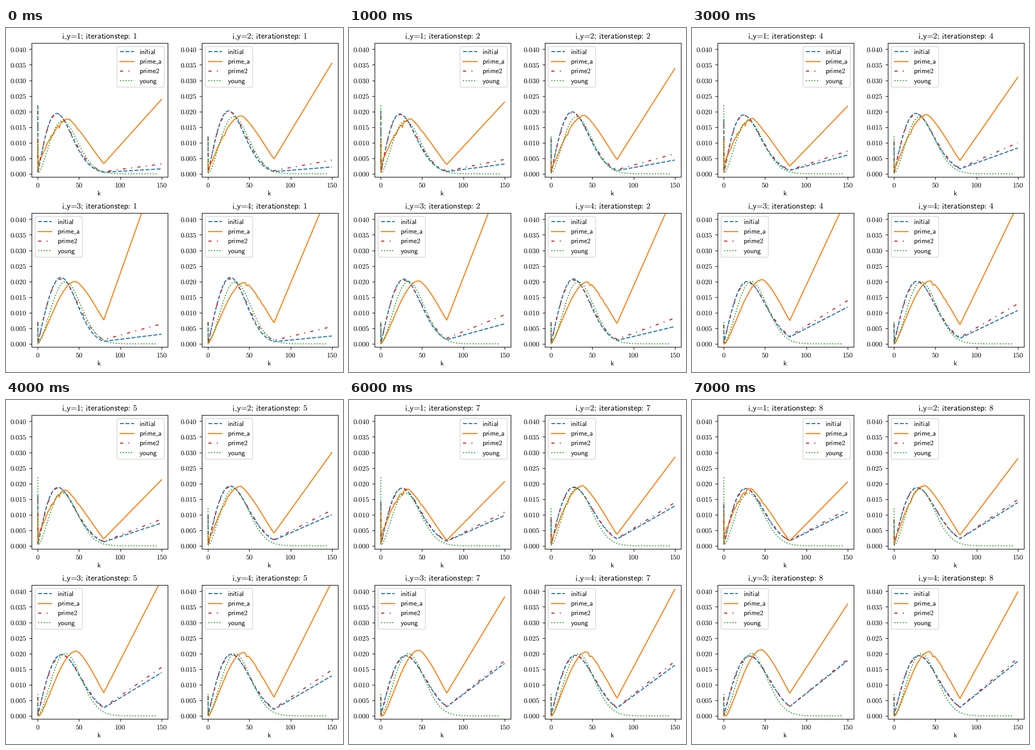
These frames come from a looping animation (671 by 686 pixels, 8000 ms). A matplotlib script:

```python
import numpy as np
import matplotlib.pyplot as plt
from matplotlib.animation import FuncAnimation
from matplotlib.patches import FancyBboxPatch

W, H, DPI = 671, 686, 100
STEPS = 8
plt.rcParams['mathtext.fontset'] = 'cm'
plt.rcParams['text.hinting'] = 'none'

BLUE, ORANGE, RED, GREEN = 'C0', 'C1', 'C3', 'C2'
STYLES = [
    ('initial', BLUE, '--'),
    (r'prime\hspace{.41}a', ORANGE, '-'),
    ('prime2', RED, (0, (3, 5, 1, 5))),
    ('young', GREEN, ':'),
]
K = np.arange(1, 81)
K_YOUNG = np.arange(1, 145)

# Triples are values at steps 1, 4 and 8; a quadratic joins them.
PANELS = [
    dict(pos=(51, 30), legend=221.1,
         initial=dict(peak=(.0194, .0189, .0184), at=(23, 24, 26.5),
                      end=(.0005, .0011, .0016), tail=(.0016, .0060, .0108),
                      spike=(.0220, .0175, .0135)),
         prime=dict(peak=(.0176, .0178, .0184), at=(37.5, 35, 33),
                    end=(.0033, .0025, .0016), tail=(.0239, .0217, .0205),
                    shift=(0, 0, 0)),
         low=.0007, base=.003, power=1, fall=1.2, start=.0105, noise=.00016,
         dips=[(19, .0007), (26, .0009), (48, .0003)],
         young=(.0170, 30, .0006, .0220)),
    dict(pos=(390, 30), legend=397,
         initial=dict(peak=(.0202, .0194, .0187), at=(25, 26.5, 28),
                      end=(.0007, .0016, .0023), tail=(.0022, .0083, .0139),
                      spike=(.0120, .0105, .0085)),
         prime=dict(peak=(.0186, .0190, .0194), at=(41, 40, 37.5),
                    end=(.0048, .0043, .0035), tail=(.0355, .0310, .0280),
                    shift=(0, 0, 0)),
         low=.0004, base=.001, power=1, fall=1.3, start=.004, noise=.00012,
         dips=[(20, .0006), (35, .0003)],
         young=(.0183, 31, .0008, .0120)),
    dict(pos=(51, 369), legend=58,
         initial=dict(peak=(.0213, .0200, .0192), at=(28, 28.5, 31),
                      end=(.0008, .0022, .0030), tail=(.0031, .0118, .0177),
                      spike=(.0070, .0062, .0060)),
         prime=dict(peak=(.0200, .0206, .0212), at=(46, 47, 46),
                    end=(.0077, .0075, .0073), tail=(.0600, .0473, .0359),
                    shift=(0, 1.5, 3)),
         low=.0002, base=0, power=1.2, fall=1.4, start=0, noise=.00006,
         dips=[], young=(.0200, 33.5, .0012, .0070)),
    dict(pos=(390, 369), legend=397,
         initial=dict(peak=(.0213, .0201, .0193), at=(27, 28, 30),
                      end=(.0007, .0018, .0027), tail=(.0025, .0107, .0175),
                      spike=(.0070, .0065, .0060)),
         prime=dict(peak=(.0197, .0202, .0206), at=(45, 44, 43),
                    end=(.0068, .0062, .0056), tail=(.0511, .0447, .0398),
                    shift=(0, .8, 1.5)),
         low=.0002, base=0, power=1.15, fall=1.35, start=0, noise=.00008,
         dips=[(47, .0008), (60, .0004), (65, .0003)],
         young=(.0199, 33, .0011, .0070)),
]


def at_step(params, n):
    return {key: np.polyval(np.polyfit((1, 4, 8), vals, 2), n)
            for key, vals in params.items()}


def hump(k, peak, at, end, a):
    """Skewed bell with its top at (at, peak), passing through (80, end)."""
    r, goal = 80 / at, np.log(end / peak)
    lo, hi = .2, 6
    for _ in range(40):
        c = (lo + hi) / 2
        if a * np.log(r) - a * (r ** c - 1) / c > goal:
            lo = c
        else:
            hi = c
    r = k / at
    return peak * r ** a * np.exp(a / c * (1 - r ** c))


def initial_curve(panel, n):
    p = at_step(panel['initial'], n)
    y = hump(K, p['peak'], p['at'], p['end'], 1)
    return np.r_[0, .2, K, 150], np.r_[p['spike'], panel['low'], y, p['tail']]


def prime_curve(panel, n):
    p = at_step(panel['prime'], n)
    peak, at, end, shift = p['peak'], p['at'], p['end'], p['shift']
    a, base = panel['power'], panel['base']
    r = np.clip((K - shift) / (at - shift), 1e-6, 1)
    rise = base + (peak - base) * r ** a * np.exp(a / 2.5 * (1 - r ** 2.5))
    t = np.clip((K - at) / (80 - at), 0, 1)
    drop = end + (peak - end) * (1 - t ** panel['fall']) ** 1.1
    y = np.where(K < at, rise, drop)
    rng = np.random.default_rng(4)
    rough = rng.normal(0, panel['noise'], K.size)
    y = y + rough * ((K > shift + 2) & (K < at - 3))
    for pos, depth in panel['dips']:
        y -= depth * np.exp(-((K - pos) / 1.1) ** 2)
    y = np.maximum(y, 0)
    return (np.r_[0, .2, K, 150],
            np.r_[panel['start'], panel['low'], y, p['tail']])


def young_curve(panel):
    peak, at, end, spike = panel['young']
    y = hump(K_YOUNG, peak, at, end, 1.5)
    return np.r_[0, .2, K_YOUNG], np.r_[spike, panel['low'], y]


def sans(body):
    return r'$\mathsf{' + body + '}$'


def roman(body):
    return r'$\mathrm{' + body + '}$'


def title(i, n):
    return sans(r'i\hspace{.41}y\hspace{-.2}=\hspace{-.2}' + str(i)
                + r';\hspace{.18}iterationstep\hspace{-.2}:\hspace{.18}'
                + str(n))


def underscore(x, baseline, width):
    over.plot([x, x + width], [baseline - .3] * 2, color='k', lw=.6,
              solid_capstyle='butt')


def draw_legend(x, y):
    over.add_patch(FancyBboxPatch(
        (x, y), 94.1, 81, boxstyle='round,pad=0,rounding_size=2.8',
        fc=(1, 1, 1, .8), ec=(.8, .8, .8, .8), lw=1))
    for row, (name, color, style) in enumerate(STYLES):
        cy = y + 10.2 + 19.35 * row
        over.plot([x + 5.6, x + 33.4], [cy, cy], color=color, ls=style, lw=1.5)
        over.text(x + 43.9, cy + 4.7, sans(name), size=10, va='baseline')
        if color == ORANGE:
            underscore(x + 77.2, cy + 4.7, 4.2)


def make_axes(x, y):
    ax = fig.add_axes([x / W, 1 - (y + 267) / H, 271 / W, 267 / H])
    xt, yt = [0, 50, 100, 150], np.arange(9) * .005
    ax.set_xticks(xt, [roman(str(v)) for v in xt])
    ax.set_yticks(yt, [roman(f'{v:.3f}') for v in yt])
    ax.set_xlim(-7.5, 157.5)
    ax.set_ylim(-.001, .042)
    return ax


fig = plt.figure(figsize=(W / DPI, H / DPI), dpi=DPI, facecolor='white')
axes = [make_axes(*p['pos']) for p in PANELS]
over = fig.add_axes([0, 0, 1, 1])
over.set_xlim(0, W)
over.set_ylim(H, 0)
over.set_autoscale_on(False)
over.axis('off')

titles, lines = [], []
for panel, ax in zip(PANELS, axes):
    x, y = panel['pos']
    titles.append(over.text(x + 59.8, y - 8.3, '', size=11.7, va='baseline'))
    underscore(x + 64.7, y - 8.3, 4.9)
    over.text(x + 134.5, y + 304, sans('k'), size=10, ha='center',
              va='baseline')
    draw_legend(panel['legend'], y + 7)
    lines.append([ax.plot([], [], color=color, ls=style, lw=1.5)[0]
                  for _, color, style in STYLES])
    lines[-1][3].set_data(*young_curve(panel))


def update(frame):
    n = frame + 1
    for i, panel in enumerate(PANELS):
        titles[i].set_text(title(i + 1, n))
        first, prime, second, _ = lines[i]
        first.set_data(*initial_curve(panel, n))
        prime.set_data(*prime_curve(panel, n))
        # The second estimate runs one iteration ahead.
        second.set_data(*initial_curve(panel, n + 1))
    return titles + [line for group in lines for line in group]


anim = FuncAnimation(fig, update, frames=STEPS, interval=1000,
                     init_func=lambda: update(0), repeat=True, repeat_delay=0)
plt.show()
```
